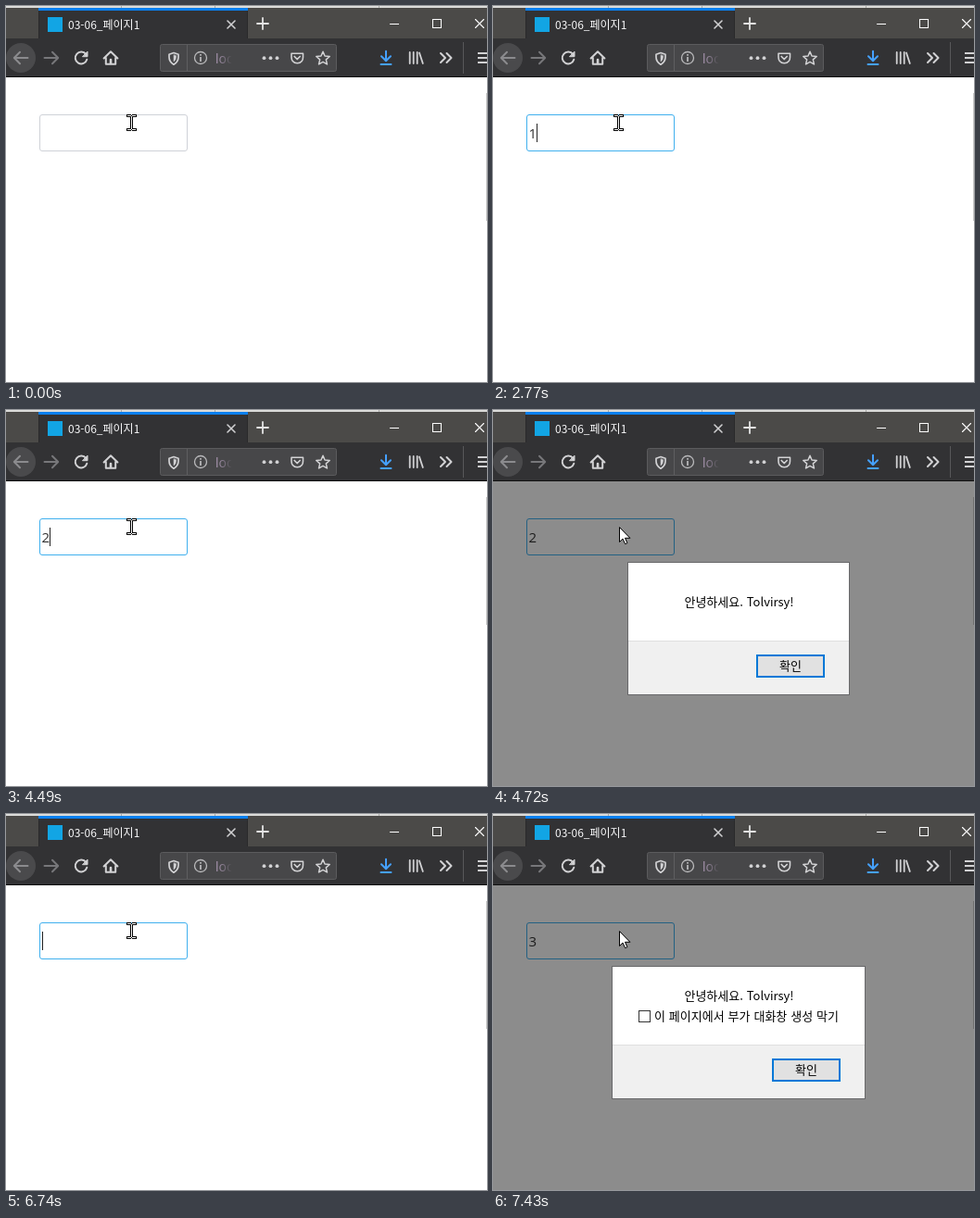
Recreate the animation shown at these times as an HTML page with a canvas. Size 519 by 406 pixels, loop 8 s.

```html
<!DOCTYPE html>
<html lang="ko">
<head>
<meta charset="utf-8">
<title>Dialog demo</title>
<style>
html, body { margin: 0; width: 100%; height: 100%; overflow: hidden; background: #fff; }
canvas { display: block; }
</style>
</head>
<body>
<canvas id="stage" width="519" height="406"></canvas>
<script>
const c = document.getElementById('stage').getContext('2d');
const LOOP = 8000;
const KR = '"Noto Sans CJK KR", "Noto Sans CJK", "Noto Sans", sans-serif';
const LATIN = '"Open Sans", "Noto Sans", sans-serif';
const ICON = '#d2d2d4', FADED = '#77777a', BLUE = '#0078d7';

// Each entry holds until the next one starts.
const steps = [
  { at: 0, text: '' },
  { at: 1220, text: '', ring: true },
  { at: 1310, text: '', focus: true, caret: true, ring: true },
  { at: 1450, text: '', focus: true, caret: true },
  { at: 1760, text: '', focus: true },
  { at: 2160, text: '1', focus: true, caret: true },
  { at: 2220, text: '1', focus: true },
  { at: 2770, text: '1', focus: true, caret: true },
  { at: 3300, text: '1', focus: true },
  { at: 3850, text: '1', focus: true, caret: true },
  { at: 4020, text: '', focus: true, caret: true },
  { at: 4400, text: '', focus: true },
  { at: 4490, text: '2', focus: true, caret: true },
  { at: 4720, text: '2', focus: true, dialog: 'plain' },
  { at: 6200, text: '2', focus: true },
  { at: 6260, text: '2', focus: true, caret: true },
  { at: 6740, text: '', focus: true, caret: true },
  { at: 7130, text: '3', focus: true, caret: true },
  { at: 7280, text: '3', focus: true },
  { at: 7430, text: '3', focus: true, dialog: 'repeat' }
];

function rect(x, y, w, h, color) {
  c.fillStyle = color;
  c.fillRect(x, y, w, h);
}

function frame(x, y, w, h, color, width = 1) {
  c.strokeStyle = color;
  c.lineWidth = width;
  c.strokeRect(x + width / 2, y + width / 2, w - width, h - width);
}

function round(x, y, w, h, r, fill, stroke) {
  c.beginPath();
  c.roundRect(x + .5, y + .5, w - 1, h - 1, r);
  c.fillStyle = fill;
  c.fill();
  c.strokeStyle = stroke;
  c.lineWidth = 1;
  c.stroke();
}

function icon(d, color = ICON, width = 2, fill) {
  const p = new Path2D(d);
  c.lineWidth = width;
  c.lineCap = c.lineJoin = 'round';
  if (fill) {
    c.fillStyle = fill;
    c.fill(p);
  }
  c.strokeStyle = color;
  c.stroke(p);
  c.lineCap = 'butt';
  c.lineJoin = 'miter';
}

function disc(x, y, r, color) {
  c.beginPath();
  c.arc(x, y, r, 0, Math.PI * 2);
  c.fillStyle = color;
  c.fill();
}

function label(s, x, y, size, color, font = KR, align = 'left') {
  c.font = `${size}px ${font}`;
  c.textAlign = align;
  c.fillStyle = color;
  c.fillText(s, x, y);
}

function star(x, y, outer, inner) {
  let d = '';
  for (let i = 0; i < 10; i++) {
    const r = i % 2 ? inner : outer, a = (i / 5 - .5) * Math.PI;
    d += `${i ? 'L' : 'M'}${x + r * Math.cos(a)} ${y + r * Math.sin(a)}`;
  }
  return d + 'Z';
}

function titleBar() {
  rect(0, 0, 519, 2, '#dcdcda');
  for (const x of [124, 225, 402]) rect(x, 0, 1, 2, '#a8a8a6');
  rect(0, 2, 519, 33, '#4b4a48');
  rect(35, 2, 226, 33, '#323234');
  rect(35, 2, 1, 33, '#29292a');
  rect(260, 2, 1, 33, '#29292a');
  rect(35, 2, 226, 3, '#0a7fee');
  rect(45, 12, 16, 16, '#12a5e4');
  label('03-06_페이지1', 67, 24.5, 12, '#f9f9fa');
  icon('M239 16l8 8M247 16l-8 8', '#d0d0d2', 1.6);
  icon('M277 13v12M271 19h12', '#e4e4e4', 1.8);
  rect(414, 19, 10, 1, '#fff');
  frame(460, 14, 10, 10, '#fff');
  icon('M506.5 14.5l9 9M515.5 14.5l-9 9', '#fff', 1.1);
}

function addressBar() {
  round(166, 41, 191, 30, 2, '#474749', '#5b5b5d');
  rect(195, 42, 1, 28, '#5f5f61');
  icon('M181 50.5l5 1.7v3q0 5-5 8q-5-3-5-8v-3Z', ICON, 1.7);
  icon('M181 53v7q2.6-2 2.6-5v-1.2Z', ICON, .5, ICON);
  icon('M203.5 56a6.5 6.5 0 1 0 13 0a6.5 6.5 0 1 0-13 0', '#b9b9bb', 1.3);
  rect(209.2, 55, 1.6, 5, '#c4c4c6');
  rect(209.2, 52, 1.6, 1.7, '#c4c4c6');
  const fade = c.createLinearGradient(225, 0, 244, 0);
  fade.addColorStop(0, '#b9a3c2');
  fade.addColorStop(1, '#474749');
  c.save();
  c.beginPath();
  c.rect(225, 44, 18, 24);
  c.clip();
  label('localhost', 226, 61.5, 14, fade, LATIN);
  c.restore();
  for (const x of [279, 286, 293]) disc(x - .5, 56.2, 1.9, ICON);
  icon('M308 51.2h12.5v4q0 6-6.2 6.5q-6.3-.5-6.3-6.5Z', ICON, 1.6);
  icon('M311.2 54.5l3 3l3-3', ICON, 1.7);
  icon(star(342, 56.8, 7.6, 3.5), ICON, 1.5);
}

function toolbar() {
  rect(0, 35, 519, 41, '#323234');
  rect(0, 76, 519, 1, '#101011');
  disc(16, 56, 16, '#4a4a4c');
  icon('M23.5 56H9M15 49.8L8.8 56l6.2 6.2', '#8b8b8e');
  icon('M41.5 56H56M50 49.8l6.2 6.2l-6.2 6.2', FADED);
  icon('M86.3 52.2a6.4 6.4 0 1 0 1 5.6', ICON);
  icon('M88 49.5v5.2h-5.2Z', ICON, 1, ICON);
  icon('M105.6 56.5l7.4-7.2l7.4 7.2M107.8 56v6.8h10.4V56', ICON);
  icon('M113 62v-4', ICON, 2.6);
  addressBar();
  icon('M410 48.7v10M405 54.2l5 5l5-5M404.5 63h11', '#45a1ff');
  icon('M435.7 50v12M439.7 50v12M443.7 50v12M446 50.5l3.8 11.5', ICON, 1.8);
  icon('M469 51l5 5l-5 5M475.5 51l5 5l-5 5', ICON);
  rect(493, 39, 1, 34, '#58585a');
  for (const y of [50, 55, 60]) rect(509, y, 10, 2, ICON);
}

function input(s) {
  round(36, 117, 160, 40, 2.5, '#fff', s.focus ? '#40b0ee' : '#cfd2d8');
  label(s.text, 38.6, 143, 15, '#333', LATIN);
  if (s.caret) rect(s.text ? 47 : 39, 127, 1, 20, '#222');
}

function beam() {
  rect(130, 117, 5, 3, '#000');
  rect(136, 117, 5, 3, '#000');
  rect(130, 132, 5, 3, '#000');
  rect(136, 132, 5, 3, '#000');
  rect(134, 118, 3, 16, '#000');
  rect(131, 118, 4, 1, '#fff');
  rect(136, 118, 4, 1, '#fff');
  rect(131, 133, 4, 1, '#fff');
  rect(136, 133, 4, 1, '#fff');
  rect(135, 119, 1, 14, '#fff');
}

function arrow() {
  icon('M136.5 127v15.5l3.6-3.4l2.5 5.6l2.3-1l-2.4-5.4h5Z', '#000', 1, '#fff');
}

function dialog(kind) {
  const more = kind === 'repeat';
  const x = more ? 128 : 145, w = more ? 274 : 240, bx = more ? 301 : 284;
  rect(x, 164, w, 144, '#fff');
  rect(x, 249, w, 59, '#f0f0f0');
  rect(x, 249, w, 1, '#dfdfdf');
  frame(x, 164, w, 144, '#68686a');
  c.wordSpacing = '1px';
  label('안녕하세요. Tolvirsy!', 265.5, more ? 201 : 212, 13, '#000', KR, 'center');
  if (more) {
    frame(157, 212, 13, 13, '#333');
    label('이 페이지에서 부가 대화창 생성 막기', 174, 223, 13, '#000');
  }
  c.wordSpacing = '0px';
  rect(bx, 264, 74, 25, '#e1e1e1');
  frame(bx, 264, 74, 25, BLUE, 2);
  label('확인', bx + 37, 281, 13, '#000', KR, 'center');
}

function draw(t) {
  const s = steps.findLast(step => step.at <= t);
  rect(0, 0, 519, 406, '#fff');
  titleBar();
  toolbar();
  rect(518, 94, 1, 138, '#c9c9c9');
  input(s);
  if (s.dialog) {
    rect(0, 77, 519, 329, 'rgba(0, 0, 0, .45)');
    dialog(s.dialog);
    arrow();
  } else {
    if (s.ring) disc(136, 126, 12, 'rgba(255, 255, 0, .47)');
    beam();
  }
}

const start = performance.now();
function tick() {
  draw((performance.now() - start) % LOOP);
  requestAnimationFrame(tick);
}
tick();
</script>
</body>
</html>
```
